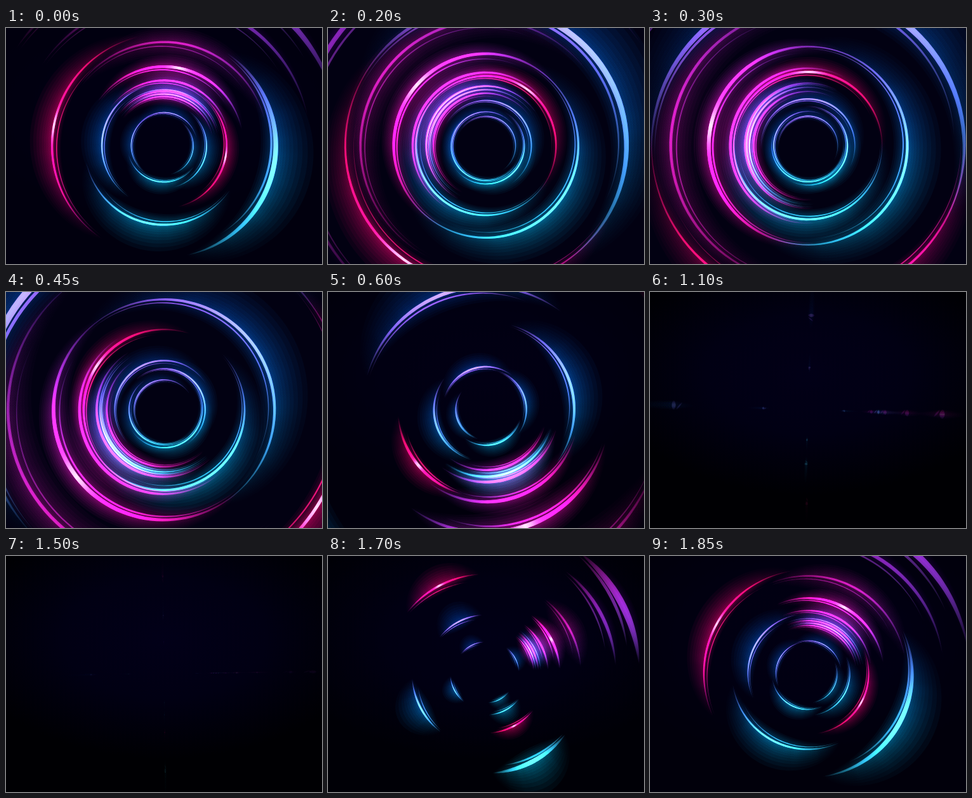
An HTML page with a canvas for the animation above (1.9 s loop, 498x373 px).

```html
<!DOCTYPE html>
<html lang="en">
<head>
<meta charset="utf-8">
<title>Light rings</title>
<style>
html, body { margin: 0; width: 100%; height: 100%; overflow: hidden; background: #000; }
canvas { display: block; }
</style>
</head>
<body>
<canvas id="stage" width="498" height="373"></canvas>
<script>
const ctx = document.getElementById('stage').getContext('2d');
const CX = 249, CY = 186, LOOP = 1900, STEP = 50, LEAD = 400;
const RAD = Math.PI / 180;

// Shared motion of all arcs: degrees swept by head and tail, and ring growth.
const TIMES = [-400, -50, 0, 200, 450, 600, 850, 1250];
const HEAD = [1.5, 115, 147, 245, 315, 345, 358, 360];
const TAIL = [0, 8, 11, 32, 120, 232, 325, 360];
const GROW = [0, 0.05, 0.11, 0.33, 0.64, 0.86, 1, 1.05];

// Spatial light runs from the top of the stage to the bottom, other light from head to tail.
// Glow reaches outwards and inwards by a share of the radius; trim lets the tail run ahead.
const COOL = {
  stops: [[200, 95, 252], [110, 130, 250], [60, 205, 235]],
  glow: [[0, 55, 130], [0, 85, 160], [0, 135, 165]],
  out: 0.34, in: 0.14, trim: 0, spatial: true
};
const PINK = {
  stops: [[235, 25, 165], [245, 45, 220], [150, 70, 235]],
  glow: [[190, 0, 90], [200, 15, 150], [120, 30, 170]],
  out: 0.15, in: 0.18, trim: 0
};
const RED = {
  stops: [[230, 25, 180], [240, 25, 110], [215, 10, 80]],
  glow: [[190, 0, 110], [190, 0, 75], [160, 0, 60]],
  out: 0.2, in: 0.08, trim: 0.5
};
const VIOLET = {
  stops: [[170, 25, 130], [150, 50, 180], [150, 80, 230]],
  glow: [[60, 0, 60], [60, 0, 90], [50, 0, 100]],
  out: 0.06, in: 0.06, trim: 0
};

// [radius, growth, start angle, palette, width, strength]
const ARCS = [
  [235, 400, 0, VIOLET, 11, 0.85],
  [200, 280, 0, VIOLET, 5.5, 0.7],
  [147, 155, 0, PINK, 3.2, 0.55],
  [154, 206, 270, RED, 3, 1],
  [154, 206, 90, COOL, 7, 1],
  [115, 93, 180, COOL, 3, 1],
  [115, 93, 0, PINK, 4, 1],
  [92, 55, 270, COOL, 2.4, 1],
  [93, 53, 90, RED, 2.5, 1],
  [97, 57, 0, PINK, 3, 0.85],
  [82, 38, 0, PINK, 2.6, 0.85],
  [75, 24, 0, PINK, 2, 0.8],
  [78, 32, 0, COOL, 1.8, 0.8],
  [86, 24, 0, COOL, 1.5, 0.7],
  [65, 20, 90, COOL, 1.8, 0.9],
  [56, 14, 180, COOL, 1.6, 1],
  [50, 16, 270, COOL, 1.4, 0.9],
  [52, 5, 0, COOL, 1.4, 0.9],
  [46, 2, 90, COOL, 1.3, 0.8]
];

const slope = (v, i) => i < 1 || i > TIMES.length - 2 ? 0
  : (v[i + 1] - v[i - 1]) / (TIMES[i + 1] - TIMES[i - 1]);

// Smooth curve through the keyed values.
function sample(v, t) {
  let i = 0;
  while (i < TIMES.length - 2 && t > TIMES[i + 1]) i++;
  const d = TIMES[i + 1] - TIMES[i];
  const x = Math.min(1, Math.max(0, (t - TIMES[i]) / d));
  const y = x * x * (3 - 2 * x);
  return v[i] * (1 - y) + v[i + 1] * y
    + d * x * (1 - x) * ((1 - x) * slope(v, i) - x * slope(v, i + 1));
}

const mix = (a, b, k) => a.map((c, i) => c + (b[i] - c) * k);
const arch = (u, p) => Math.pow(Math.max(0, Math.sin(Math.PI * u)), p);

function tint(pal, [a, b, c], u, angle) {
  const k = pal.spatial ? 1 + Math.sin(angle + 0.25) : 2 * u;
  return k < 1 ? mix(a, b, k) : mix(b, c, k - 1);
}

// Conic gradient along an arc; shade(u, angle) returns [rgb, alpha].
function along(from, span, shade) {
  const g = ctx.createConicGradient(from, CX, CY);
  for (let i = 0; i <= 40; i++) {
    const u = i / 40;
    const [rgb, alpha] = shade(u, from + u * span);
    g.addColorStop(u * span / (2 * Math.PI), `rgba(${rgb.map(Math.round)},${alpha.toFixed(3)})`);
  }
  return g;
}

// Crescent between two offsets that close to points at both ends.
function crescent(from, span, radius, inner, outer) {
  const n = 64;
  ctx.beginPath();
  for (let i = 0; i <= 2 * n + 1; i++) {
    const back = i > n;
    const u = (back ? 2 * n + 1 - i : i) / n;
    const r = radius(u) + (back ? inner : outer) * arch(u, 0.8);
    const a = from + u * span;
    ctx.lineTo(CX + r * Math.cos(a), CY + r * Math.sin(a));
  }
  ctx.fill();
}

function drawArc([base, growth, start, pal, width, strength], head, tail, grow) {
  const r = base + growth * grow;
  const end = tail + (head - tail) * pal.trim * grow * grow;
  const from = (start - head) * RAD, span = (head - end) * RAD;
  const power = strength * Math.min(1, span / RAD / 25);
  const w = width * (1 + grow) / 2;
  const ring = () => r;

  ctx.fillStyle = along(from, span, (u, a) => [tint(pal, pal.glow, u, a), 0.07 * power * arch(u, 1.3)]);
  for (let k = 1; k <= 12; k++) {
    const reach = r * Math.pow(k / 12, 1.9);
    crescent(from, span, ring, -reach * pal.in, reach * pal.out);
  }

  // Only the full-strength warm arcs carry a white spark.
  const spark = strength === 1 ? 0.85 : 0;
  ctx.fillStyle = along(from, span, (u, a) => {
    const hot = pal.spatial ? 0.25 * arch(u, 4) : spark * Math.exp(-Math.pow((u - 0.5) / 0.045, 2));
    return [mix(tint(pal, pal.stops, u, a), [255, 255, 255], hot), power * arch(u, 0.9)];
  });
  crescent(from, span, ring, -w * 1.15, w * 0.85);

  // Thinner companion strand that leaves the ring towards its tail.
  const part = span * 0.85;
  ctx.fillStyle = along(from, part, (u, a) => [tint(pal, pal.stops, u, a), 0.8 * power * arch(u, 0.9)]);
  crescent(from, part, u => r * (0.98 - 0.045 * u), -w * 0.45, w * 0.45);
}

function backdrop(light) {
  ctx.globalCompositeOperation = 'source-over';
  ctx.fillStyle = '#000003';
  ctx.fillRect(0, 0, 498, 373);
  ctx.save();
  ctx.translate(CX, 130);
  ctx.scale(1.7, 1);
  const g = ctx.createRadialGradient(0, 0, 0, 0, 0, 190);
  g.addColorStop(0, '#020018');
  g.addColorStop(0.5, '#010013');
  g.addColorStop(1, '#000003');
  ctx.fillStyle = g;
  ctx.fillRect(-250, -140, 500, 400);
  ctx.restore();
  ctx.fillStyle = `rgba(2,1,18,${light})`;
  ctx.fillRect(0, 0, 498, 373);
}

function frame(now) {
  let t = Math.floor(now % LOOP / STEP) * STEP;
  if (t >= LOOP - LEAD) t -= LOOP;
  const head = sample(HEAD, t), tail = sample(TAIL, t), grow = sample(GROW, t);
  backdrop(Math.min(1, Math.max(0, (head - tail) / 180)));
  if (head - tail > 0.2) {
    ctx.globalCompositeOperation = 'lighter';
    for (const arc of ARCS) drawArc(arc, head, tail, grow);
  }
  requestAnimationFrame(frame);
}
requestAnimationFrame(frame);
</script>
</body>
</html>
```
